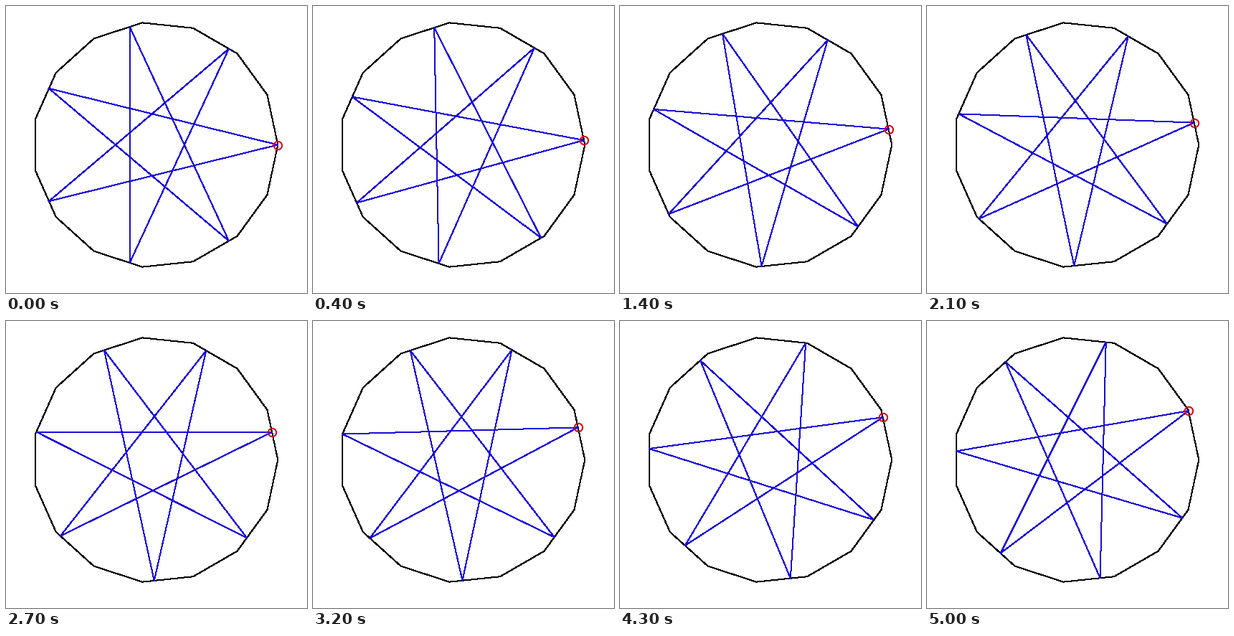
A matplotlib script that plays this animation: 420 by 400 pixels, repeating every 5.1 s.

```python
import math

import matplotlib.pyplot as plt
import numpy as np
from matplotlib.animation import FuncAnimation

W, H, DPI = 420, 400, 100
PX = 72 / DPI                       # one pixel in points
FRAMES, INTERVAL = 51, 100
SIDES, TIPS, TURNS = 15, 7, 3
CX, CY, R = 208.2, 193.5, 171.1


def on_circle(angle):
    return complex(math.cos(angle), math.sin(angle))


CORNERS = [on_circle(2 * math.pi * k / SIDES) for k in range(SIDES)]


def on_rim(u):
    """Point on the unit polygon; u counts sides walked from the right corner."""
    k = math.floor(u)
    a, b = CORNERS[k % SIDES], CORNERS[(k + 1) % SIDES]
    return a + (b - a) * (u - k)


def bisect(too_low, lo, hi, rounds=32):
    for _ in range(rounds):
        mid = (lo + hi) / 2
        if too_low(mid):
            lo = mid
        else:
            hi = mid
    return (lo + hi) / 2


def next_tip(u, chord):
    p = on_rim(u)
    return bisect(lambda v: abs(on_rim(v) - p) < chord, u + 5, u + 7)


def walk(u, chord):
    path = [u]
    for _ in range(TIPS):
        path.append(next_tip(path[-1], chord))
    return path


def to_screen(points):
    z = np.array(points)
    return CX + R * z.real, CY - R * z.imag


def star(u):
    """Equal-sided star from rim position u that closes after TURNS turns."""
    goal = u + TURNS * SIDES
    chord = bisect(lambda c: walk(u, c)[-1] < goal, 1.88, 1.94, 28)
    tips = [on_rim(v) for v in walk(u, chord)[:TIPS]]
    return to_screen(tips + tips[:1])


def start_at(i):
    """Start position along the first side: a little quicker at first."""
    return (i + min(3, i / 4)) / 54


stars = [star(start_at(i)) for i in range(FRAMES)]

fig = plt.figure(figsize=(W / DPI, H / DPI), dpi=DPI, facecolor="white")
ax = fig.add_axes([0, 0, 1, 1])
ax.set_xlim(0, W)
ax.set_ylim(H, 0)
ax.axis("off")

ax.plot(*to_screen(CORNERS + CORNERS[:1]), color="black", lw=PX,
        antialiased=False, zorder=1)
lines, = ax.plot([], [], color="#1a0adc", lw=PX, antialiased=False, zorder=2)
ring, = ax.plot([], [], "o", ms=11.4 * PX, mfc="none", mec="#d80018",
                mew=2 * PX, zorder=3)


def draw(i):
    x, y = stars[i]
    lines.set_data(x, y)
    ring.set_data(x[:1], y[:1])
    return lines, ring


anim = FuncAnimation(fig, draw, frames=FRAMES, interval=INTERVAL,
                     repeat=True, repeat_delay=0)
plt.show()
```
